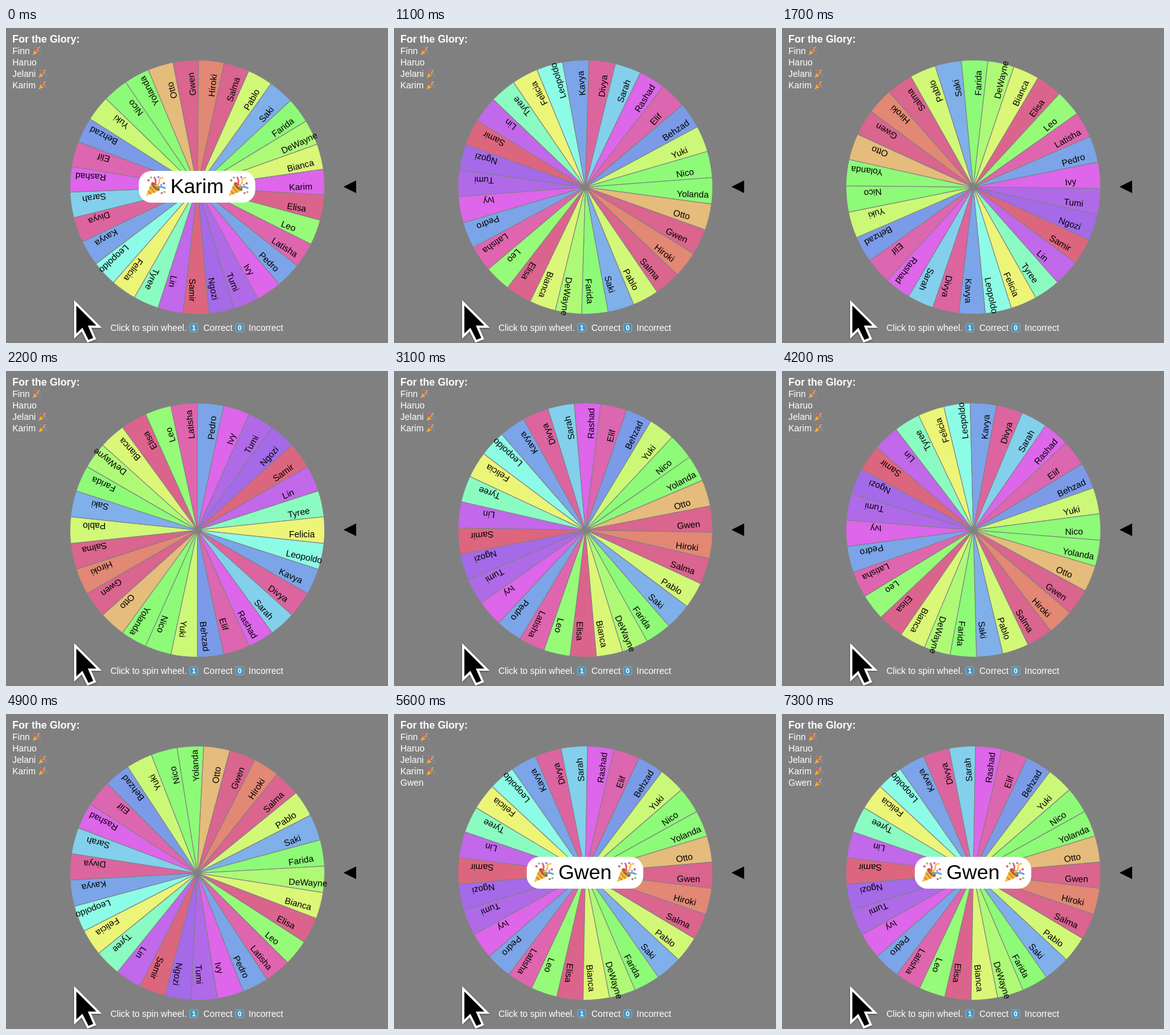
Write an HTML page that moves like this. It is 600 by 496 pixels and loops after 7600 ms.

```html
<!DOCTYPE html>
<html lang="en">
<head>
<meta charset="utf-8">
<title>Name wheel</title>
<style>
  html, body { margin: 0; width: 100%; height: 100%; overflow: hidden; background: #808080; }
  svg { display: block; }
  text { font: 14px "Liberation Sans", Arial, Helvetica, sans-serif; white-space: pre; }
  .title { font-size: 16px; font-weight: bold; }
  .light { fill: #fff; }
  .winner { font-size: 32px; text-anchor: middle; }
  .key { font-size: 11px; font-weight: bold; text-anchor: middle; fill: #fff; }
</style>
</head>
<body>
<svg id="stage" width="600" height="496" viewBox="0 0 600 496">
  <defs>
    <symbol id="party" viewBox="0 0 20 20">
      <path d="M1 19.3 6.2 6.6Q11.5 8.6 13.6 14.1Z" fill="#f6bd45"/>
      <path d="M4.6 10.6 9.2 16M3 14.6 6 17.3" stroke="#d88a2c" stroke-width="1.3"/>
      <ellipse cx="9.9" cy="10.3" rx="5.1" ry="2.2" transform="rotate(45 9.9 10.3)" fill="#a9652a"/>
      <g fill="none" stroke-width="1.6" stroke-linecap="round">
        <path d="M8.6 9.4Q11.4 6.2 9 2" stroke="#e9577c"/>
        <path d="M10.4 9.8Q13.6 8.6 13.4 5.4T16.6 2.2" stroke="#f3c64b"/>
        <path d="M11.2 11.6Q14.6 9.6 18.6 11.8" stroke="#58a9e6"/>
      </g>
      <g fill="#e9577c"><circle cx="17.6" cy="7.4" r="1.1"/><circle cx="3.4" cy="4.6" r="1.1"/><circle cx="15.6" cy="16.4" r="1"/></g>
      <g fill="#7ccb62"><circle cx="5.8" cy="2" r="1"/><circle cx="18.2" cy="15.4" r="1"/></g>
      <g fill="#a777e0"><circle cx="12.6" cy="1.6" r="1"/><circle cx="15.2" cy="8.8" r=".9"/></g>
    </symbol>
  </defs>

  <rect width="600" height="496" fill="#808080"/>
  <g id="wheels" transform="translate(300.5 250.5)"></g>
  <path d="M530 250 550 240V260Z"/>

  <g class="light">
    <text class="title" x="10" y="23">For the Glory:</text>
    <g id="board"></g>
    <text x="164" y="477">Click to spin wheel.</text>
    <text x="310" y="477">Correct</text>
    <text x="381" y="477">Incorrect</text>
  </g>
  <g fill="#4a92bb" stroke="#86adc2">
    <rect x="288.5" y="465.5" width="13" height="13" rx="2.5"/>
    <rect x="360.5" y="465.5" width="13" height="13" rx="2.5"/>
  </g>
  <text class="key" x="295" y="476">1</text>
  <text class="key" x="367" y="476">0</text>

  <g id="popup">
    <rect x="208.5" y="225" width="183" height="50" rx="20" fill="#fff"/>
    <use href="#party" x="218" y="232" width="34" height="34"/>
    <text class="winner" id="winner" x="300" y="260"></text>
    <use href="#party" x="348" y="232" width="34" height="34"/>
  </g>

  <path d="M110.500 437V481L120 472 129.500 491 137 488 128.500 468.500H142Z"
        stroke="#fff" stroke-width="7" paint-order="stroke"
        style="filter: drop-shadow(0 1px 1.500px rgba(0,0,0,.4))"/>
</svg>

<script>
const LOOP = 7600, STEP = 100, SPIN = 900, STOP = 5600, CHEER = 7300;
const REST = 91;
const ROOT_LEFT = [ // time, square root of the degrees left to turn
  [815, 63.65], [1700, 51.676], [2200, 44.911], [3100, 32.955],
  [4200, 18.067], [4900, 8.376], [5520, 0]
];

const slices = `Elisa db648d, Leo 96fb78, Latisha df66ae, Pedro 7ba5e8, Ivy dd66ea,
  Tumi b06ae8, Ngozi a46ae8, Samir dd667f, Lin c268ea, Tyree 8afcc2, Felicia ecf577,
  Leopoldo 8dfce6, Kavya 7ba5e8, Divya dc65a0, Sarah 83d0ec, Rashad dd66ea, Elif dd66b0,
  Behzad 7b9be8, Yuki cbf977, Nico 8dfb78, Yolanda 8dfb78, Otto e5bc7b, Gwen da658e,
  Hiroki e28874, Salma da658e, Pablo d2f877, Saki 7fb0ea, Farida 8dfb78, DeWayne aefa77,
  Bianca dbf777, Karim de66ea`.split(",").map(s => s.trim().split(" "));

const $ = id => document.getElementById(id);

function add(parent, tag, attrs, text = "") {
  const el = document.createElementNS("http://www.w3.org/2000/svg", tag);
  for (const key in attrs) el.setAttribute(key, attrs[key]);
  el.textContent = text;
  return parent.appendChild(el);
}

function makeWheel(list) {
  const wheel = add($("wheels"), "g", {});
  const arc = 360 / list.length, half = arc * Math.PI / 360, r = 200;
  const x = r * Math.cos(half), y = r * Math.sin(half);
  const turn = i => `rotate(${(i + 0.5) * arc})`;
  list.forEach(([, color], i) => add(wheel, "path", {
    d: `M0 0L${x} ${-y}A${r} ${r} 0 0 1 ${x} ${y}Z`,
    fill: "#" + color, stroke: "#808080", transform: turn(i)
  }));
  list.forEach(([name], i) => add(wheel, "text", { x: 144, y: 11, transform: turn(i) }, name));
  return wheel;
}

function addRow(name, i, cheer) {
  const row = add($("board"), "g", {});
  const y = 41 + 18 * i;
  const label = add(row, "text", { x: 10, y }, name);
  const x = 14 + label.getComputedTextLength();
  const icon = cheer && add(row, "use", { href: "#party", x, y: y - 12, width: 14, height: 14 });
  return { row, icon };
}

const before = makeWheel(slices);
const after = makeWheel(slices.slice(0, -1));
before.setAttribute("transform", "rotate(3.5)");

const rows = [["Finn", 1], ["Haruo", 0], ["Jelani", 1], ["Karim", 1], ["Gwen", 1]]
  .map(([name, cheer], i) => addRow(name, i, cheer));
const last = rows[4];

function angleAt(t) {
  const i = ROOT_LEFT.findIndex(k => k[0] > t);
  if (i < 0) return REST;
  const [t0, a] = ROOT_LEFT[i - 1], [t1, b] = ROOT_LEFT[i];
  return REST - (a + (b - a) * (t - t0) / (t1 - t0)) ** 2;
}

const show = (el, on) => el.setAttribute("visibility", on ? "visible" : "hidden");

function draw(now) {
  const t = Math.floor(Math.max(0, now - start) % LOOP / STEP) * STEP;
  const fresh = t >= SPIN, done = t >= STOP;
  show(before, !fresh);
  show(after, fresh);
  if (fresh) after.setAttribute("transform", `rotate(${angleAt(t)})`);
  show($("popup"), !fresh || done);
  $("winner").textContent = done ? "Gwen" : "Karim";
  show(last.row, done);
  show(last.icon, t >= CHEER);
  requestAnimationFrame(draw);
}

const start = performance.now();
draw(start);
</script>
</body>
</html>
```
